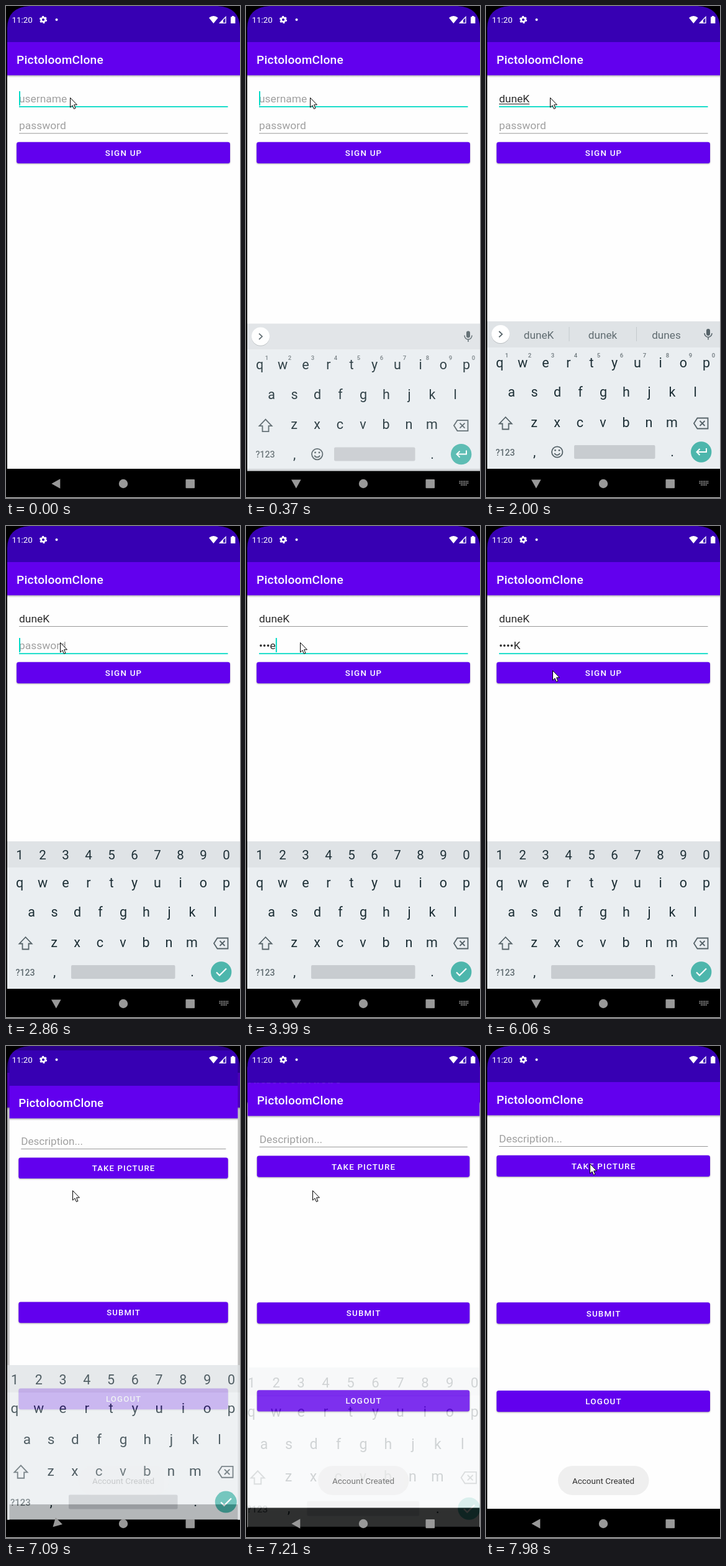
Recreate the animation shown at these times as an HTML page. Size 377 px wide and 791 px high, loop 8000 ms.

```html
<!DOCTYPE html>
<html lang="en">
<head>
<meta charset="utf-8">
<title>Sign up</title>
<style>
html, body { margin: 0; width: 100%; height: 100%; overflow: hidden; background: #000; }
svg { display: block; width: 377px; height: 791px; font-family: Roboto, sans-serif; }
text { white-space: pre; }
.title { font-size: 19.1px; font-weight: 500; letter-spacing: .25px; fill: #fff; }
.field { font-size: 17.4px; fill: #2b2b2b; }
.hint { font-size: 17.4px; fill: #a0a0a0; }
.label { font-size: 13.4px; font-weight: 500; letter-spacing: 1.2px; fill: #fff; }
.button { fill: #6200ee; filter: drop-shadow(0 1px 1px rgba(0,0,0,.32)); }
.pressed { filter: drop-shadow(0 3px 2px rgba(0,0,0,.38)); }
.key { font-size: 21.5px; fill: #1d2f36; }
.digit { font-size: 20.5px; fill: #1d2f36; }
.tiny { font-size: 9.5px; font-weight: 500; fill: #6d777c; }
.word { font-size: 17.2px; fill: #5f6b70; }
.mid { text-anchor: middle; }
.line { fill: none; stroke: #566369; stroke-width: 1.8; }
.nav { fill: #999; }
.page { transform-origin: 189.5px 372px; }
#keyboard { transform-origin: 189px 383px; }
</style>
</head>
<body>
<svg id="stage" viewBox="0 0 377 791"></svg>
<script>
const rect = (x, y, w, h, fill, extra = '') =>
  `<rect x="${x}" y="${y}" width="${w}" height="${h}" fill="${fill}" ${extra}/>`;
const text = (x, y, cls, str, extra = '') =>
  `<text x="${x}" y="${y}" class="${cls}" ${extra}>${str}</text>`;
const line = (d, extra = '') => `<path class="line" d="${d}" ${extra}/>`;
const keyRow = (chars, x, y, cls, step = 37) =>
  [...chars].map((c, i) => text(x + i * step, y, cls + ' mid', c)).join('');

const button = (y, label, id = '') =>
  `<rect x="17" y="${y}" width="344" height="34.3" rx="3.5" class="button" ${id && `id="${id}"`}/>`;
const buttonLabel = (y, label) => text(189.6, y + 22.2, 'label mid', label);

const page = (id, content) => `<g id="${id}" class="page">
  ${rect(2, 0, 375, 58, '#3700b3')}
  ${rect(2, 111, 375, 633, '#fefefe')}
  ${rect(2, 111, 375, 4, 'url(#shade)')}
  ${rect(2, 58, 375, 53.4, '#6200ee')}
  ${rect(2, 744, 375, 47, '#000')}
  ${text(17, 92.5, 'title', 'PictoloomClone')}
  ${content}</g>`;

const signUp = page('signUp', `
  ${text(21, 155, 'hint', 'username', 'id="userHint"')}
  ${text(21, 198, 'hint', 'password', 'id="passHint"')}
  ${text(21, 155, 'field', '', 'id="user"')}
  ${text(21, 198, 'field', '', 'id="pass"')}
  ${rect(21, 157, 0, 1.1, '#2b2b2b', 'id="compose"')}
  ${rect(21, 161, 336.5, 1, '#999', 'id="userLine"')}
  ${rect(21, 204.3, 336.5, 1, '#999', 'id="passLine"')}
  ${rect(21, 137, 2, 23, '#03dac5', 'id="caret"')}
  ${button(218.7, '', 'signButton')}
  <circle id="ripple" cx="150" cy="236" fill="#fff" clip-path="url(#signClip)"/>
  ${buttonLabel(218.7, 'SIGN UP')}
  ${rect(-20, -20, 420, 840, '#000', 'id="dim"')}`);

const feed = page('feed', `
  ${text(21, 155, 'hint', 'Description...')}
  ${rect(21, 161, 336.5, 1, '#999')}
  ${[[175.7, 'TAKE PICTURE'], [412.3, 'SUBMIT'], [554, 'LOGOUT']]
    .map(([y, label]) => button(y) + buttonLabel(y, label)).join('')}`);

const keyboard = `<g id="keyboard">
  ${rect(2, 507, 375, 42, '#dfe3e6')}
  ${rect(2, 549, 375, 195, '#eaeef1')}
  ${keyRow('qwertyuiop', 22, 580.5, 'key')}
  ${keyRow('asdfghjkl', 41, 628, 'key')}
  ${keyRow('zxcvbnm', 77.5, 676.5, 'key')}
  ${line('M31.5 661 L21.5 671.5 H26.5 V680.5 H36.5 V671.5 H41.5 Z')}
  ${line('M335 671 L340.5 662.5 H357.5 V679.5 H340.5 Z M344.5 667 l8 8 m0 -8 l-8 8')}
  ${text(31, 722.5, 'word mid', '?123', 'style="font-size:14.2px;font-weight:500"')}
  ${text(78, 724, 'key mid', ',')}
  ${text(300, 724, 'key mid', '.')}
  <circle cx="346.7" cy="717" r="16.7" fill="#4db6ac"/>
  <g id="plainKeys">
    ${keyRow('1234567890', 33.5, 565, 'tiny')}
    <circle cx="23.5" cy="528.5" r="14.6" fill="#b9bec1"/>
    <circle cx="23.5" cy="527.5" r="14.6" fill="#fff"/>
    ${line('M21 523 l5 4.7 l-5 4.7')}
    ${rect(355, 519, 6, 11, '#566369', 'rx="3"')}
    ${line('M352 526 a6 6.5 0 0 0 12 0 M358 532.5 v4', 'style="stroke-width:1.5"')}
    ${line('M106 717 a8.7 8.7 0 1 0 17.4 0 a8.7 8.7 0 1 0 -17.4 0 M110.4 719 a4.6 4.4 0 0 0 8.6 0')}
    <circle cx="111.5" cy="714.3" r="1.4" fill="#566369"/>
    <circle cx="118" cy="714.3" r="1.4" fill="#566369"/>
    ${rect(142, 706, 130.5, 22, '#c8ccd0', 'rx="2"')}
    ${line('M355 711 v6 h-16 m5.5 -5 l-5 5 l5 5', 'style="stroke:#fff;stroke-width:2"')}
    <g id="words">
      ${rect(133.5, 516, 1, 23, '#c3c9cc')}
      ${rect(242, 516, 1, 23, '#c3c9cc')}
      ${[85, 188, 290.5].map(x => text(x, 534.5, 'word mid', '')).join('')}
    </g>
  </g>
  <g id="secretKeys">
    ${keyRow('1234567890', 22, 536.3, 'digit')}
    ${rect(105, 706, 167.5, 22, '#c8ccd0', 'rx="2"')}
    ${line('M339 717.5 l5 5 l11 -11', 'style="stroke:#fff;stroke-width:2.2"')}
  </g></g>`;

const toast = `<g id="toast">
  ${rect(116, 675, 146.5, 47, '#efefef', 'rx="23.5"')}
  ${text(189, 704, 'mid', 'Account Created', 'font-size="13.5" fill="#333"')}</g>`;

const keyDots = [0, 1, 2].map(r => [0, 1, 2, 3, 4, 5].map(c =>
  r === 2 && (c === 0 || c === 5) ? '' : rect(343.5 + c * 2.6, 763.5 + r * 2.8, 1.7, 1.8, '#999')).join('')).join('');

const chrome = `
  ${text(9.5, 27.3, '', '11:20', 'font-size="13.4" fill="#fff"')}
  <g fill="none" stroke="#fff">
    <circle cx="60" cy="22" r="3.4" stroke-width="2.6"/>
    <circle cx="60" cy="22" r="5.1" stroke-width="2" stroke-dasharray="3 2.34"/>
    <path d="M344.5 27.3 L354 17.5 V27.3 Z" stroke-width="1.3"/>
  </g>
  <g fill="#fff">
    <circle cx="81.5" cy="22" r="2"/>
    <path d="M334.3 28 L327 19 Q334.3 13 341.6 19 Z"/>
    <path d="M344 28 L350 21.5 V28 Z"/>
    <path d="M362 17.5 h2 v-1.5 h3.4 v1.5 h2 v10.5 h-7.4 z"/>
  </g>
  <path id="back" class="nav" d="M-7.5 0 L6.5 -7.8 V7.8 Z"/>
  <circle class="nav" cx="189" cy="768" r="7.2"/>
  <rect class="nav" x="289.5" y="761" width="14.5" height="14.2" rx="1"/>
  <g id="navKeys">${keyDots}</g>
  <path d="M0 0 H38 Q2 2 2 36 V791 H0 Z M377 0 H341 Q377 2 377 36 Z"/>
  ${rect(0, 790, 377, 1, '#d8d8d8')}
  <path id="mouse" d="M.5 .5 V16 L4 12.8 L6.4 18.4 L8.9 17.3 L6.6 11.8 H11.4 Z" fill="#fff" stroke="#000"/>`;

const stage = document.getElementById('stage');
stage.innerHTML = `<defs>
  <linearGradient id="shade" x2="0" y2="1">
    <stop stop-color="#000" stop-opacity=".3"/><stop offset="1" stop-color="#000" stop-opacity="0"/>
  </linearGradient>
  <clipPath id="signClip"><rect x="17" y="218.7" width="344" height="34.3" rx="3.5"/></clipPath>
  </defs>` + rect(0, 0, 377, 791, '#000') + signUp + feed + keyboard + toast + chrome;

const LOOP = 8000;
const start = {
  user: '', pass: '', focus: 'user', caret: 1, compose: 0, words: null, secret: 0,
  kbAlpha: 0, kbY: 0, grow: 1, feed: 0, dim: 0, toast: 0,
  back: 0, navKeys: 0, mouse: [103, 147], ripple: [0, 0], pressed: 0
};
// Each step holds until the next one.
const steps = [
  [250, { kbAlpha: .5, kbY: 28, back: -45 }],
  [370, { kbAlpha: .9, kbY: 3.6, back: -90, navKeys: 1 }],
  [510, { kbAlpha: 1, kbY: 0, user: 'd', compose: 1 }],
  [630, { user: 'du', words: ['du', 'due', 'dude'] }],
  [880, { user: 'dun' }],
  [1000, { words: ['dun', 'dune', 'dunk'] }],
  [1120, { user: 'dune', words: ['dune', 'dunes', 'duned'] }],
  [1510, { user: 'duneK' }],
  [1630, { words: ['duneK', 'dunek', 'dunes'] }],
  [2000, { caret: 0 }],
  [2120, { mouse: [101, 151] }],
  [2240, { mouse: [97, 162] }],
  [2360, { mouse: [91, 175] }],
  [2480, { mouse: [88, 184], caret: 1 }],
  [2600, { mouse: [87, 187] }],
  [2740, { focus: 'pass', compose: 0, words: null }],
  [2860, { secret: 1 }],
  [3100, { pass: 'd' }],
  [3350, { pass: '•u' }],
  [3740, { pass: '••n' }],
  [3990, { pass: '•••e' }],
  [4490, { pass: '••••K' }],
  [5010, { caret: 0 }],
  [5160, { mouse: [91, 197] }],
  [5280, { mouse: [102, 221] }],
  [5400, { mouse: [107, 232], caret: 1 }],
  [5780, { ripple: [200.5, .24], pressed: 1 }],
  [5940, { ripple: [260, .14], caret: 0 }],
  [6060, { ripple: [0, 0], pressed: 0 }],
  [7090, { feed: .981, grow: 1.048, dim: .24, kbAlpha: .77, toast: .2, back: -45, navKeys: 0 }],
  [7210, { feed: .996, grow: 1.08, kbAlpha: .2, toast: .65, back: 0 }],
  [7330, { feed: 1, grow: 1, kbAlpha: 0, toast: 1 }],
  [7830, { mouse: [142, 197] }],
  [7980, { mouse: [167, 189] }]
];

const $ = id => document.getElementById(id);
const set = (id, attrs) => { for (const k in attrs) $(id).setAttribute(k, attrs[k]); };
const show = (id, on) => { $(id).style.display = on ? '' : 'none'; };

function draw(s) {
  for (const id of ['user', 'pass']) {
    const focused = s.focus === id;
    $(id).textContent = s[id];
    show(id + 'Hint', !s[id]);
    set(id + 'Line', { height: focused ? 1.8 : 1, fill: focused ? '#03dac5' : '#999' });
  }
  const width = s[s.focus] ? $(s.focus).getComputedTextLength() : 0;
  show('caret', s.caret);
  set('caret', { x: 21 + width, y: s.focus === 'user' ? 137 : 180 });
  set('compose', { width: s.compose ? width : 0 });
  set('ripple', { r: s.ripple[0], opacity: s.ripple[1] });
  $('signButton').classList.toggle('pressed', !!s.pressed);

  $('signUp').style.transform = `scale(${s.grow})`;
  set('dim', { opacity: s.dim });
  show('feed', s.feed);
  $('feed').style.transform = `scale(${s.feed})`;

  show('keyboard', s.kbAlpha);
  $('keyboard').style.opacity = s.kbAlpha;
  $('keyboard').style.transform = `translateY(${s.kbY}px) scale(${s.grow})`;
  show('plainKeys', !s.secret);
  show('secretKeys', s.secret);
  show('words', s.words);
  if (s.words) $('words').querySelectorAll('text').forEach((el, i) => { el.textContent = s.words[i]; });

  set('toast', { opacity: s.toast });
  show('navKeys', s.navKeys);
  set('back', { transform: `translate(80.8 768) rotate(${s.back})` });
  set('mouse', { transform: `translate(${s.mouse})` });
}

let shown = -1;
function tick() {
  const time = performance.now() % LOOP;
  const count = steps.filter(([at]) => at <= time).length;
  if (count !== shown) {
    shown = count;
    draw(Object.assign({}, start, ...steps.slice(0, count).map(step => step[1])));
  }
  requestAnimationFrame(tick);
}
tick();
</script>
</body>
</html>
```
